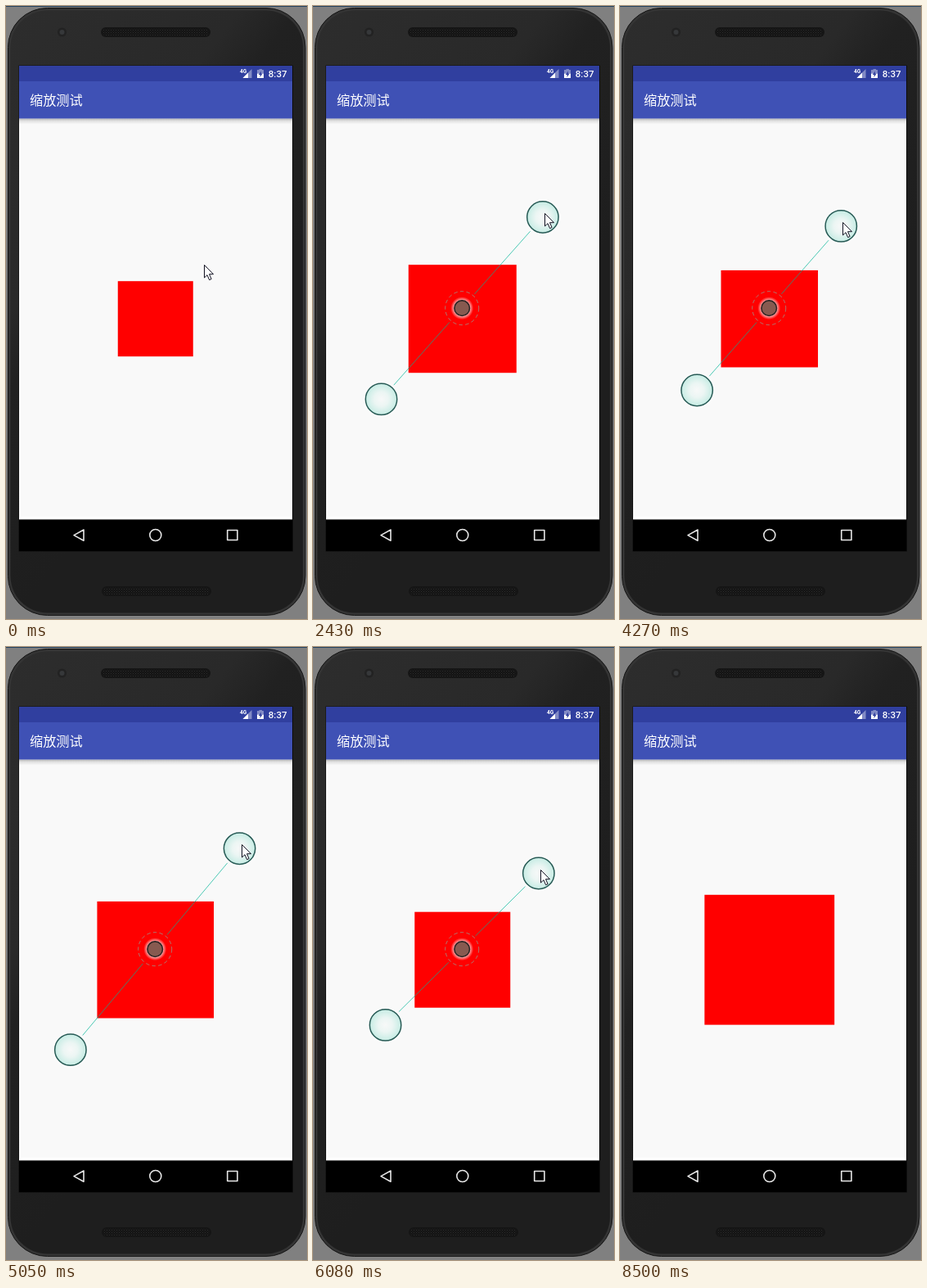
Recreate the animation shown at these times as an HTML page. Size 368 by 749 pixels, loop 8600 ms.

```html
<!DOCTYPE html>
<html lang="zh">
<head>
<meta charset="utf-8">
<title>缩放测试</title>
<style>
html, body { margin: 0; width: 100%; height: 100%; overflow: hidden; background: #808080; }
svg { display: block; }
.title { font: 16.2px "Noto Sans CJK SC", "Noto Sans CJK", sans-serif; fill: #fff; }
.clock { font: 500 11.5px Roboto, sans-serif; fill: #fff; }
.net { font: 700 6.5px Roboto, sans-serif; fill: #fff; }
.nav { fill: none; stroke: #e6e6e6; stroke-width: 1.6; stroke-linejoin: round; }
.ray { stroke: #00b496; stroke-opacity: .7; }
</style>
</head>
<body>
<svg width="368" height="749" viewBox="0 0 368 749">
  <defs>
    <linearGradient id="shell" gradientUnits="userSpaceOnUse" x1="0" y1="0" x2="368" y2="280">
      <stop offset="0" stop-color="#2d2d2d"/>
      <stop offset=".5" stop-color="#292929"/>
      <stop offset=".62" stop-color="#212121"/>
      <stop offset="1" stop-color="#1e1e1e"/>
    </linearGradient>
    <linearGradient id="shade" x2="0" y2="1">
      <stop offset="0" stop-opacity=".28"/>
      <stop offset=".4" stop-opacity=".1"/>
      <stop offset="1" stop-opacity="0"/>
    </linearGradient>
    <radialGradient id="teal">
      <stop offset="0" stop-color="#3cc8aa" stop-opacity=".01"/>
      <stop offset=".45" stop-color="#3cc8aa" stop-opacity=".07"/>
      <stop offset="1" stop-color="#3cc8aa" stop-opacity=".27"/>
    </radialGradient>
    <radialGradient id="halo">
      <stop offset=".79" stop-color="#fff" stop-opacity="0"/>
      <stop offset=".8" stop-color="#fff" stop-opacity=".5"/>
      <stop offset="1" stop-color="#fff" stop-opacity="0"/>
    </radialGradient>
    <radialGradient id="glow">
      <stop offset=".7" stop-color="#fff" stop-opacity=".65"/>
      <stop offset="1" stop-color="#fff" stop-opacity="0"/>
    </radialGradient>
    <pattern id="mesh" width="3" height="3" patternUnits="userSpaceOnUse">
      <rect width="3" height="3" fill="#131313"/>
      <rect width="1" height="1" fill="#2c2c2c"/>
      <rect x="1.5" y="1.5" width="1" height="1" fill="#272727"/>
    </pattern>
    <g id="grille">
      <rect width="134" height="12" rx="6" fill="#151515"/>
      <rect x="2" y="1.5" width="130" height="9" rx="4.5" fill="url(#mesh)"/>
    </g>
    <g id="finger">
      <circle r="24" fill="url(#halo)"/>
      <circle r="19.2" fill="url(#teal)" stroke="#275a55" stroke-width="1.5"/>
    </g>
  </defs>

  <!-- phone -->
  <rect width="368" height="749" fill="#808080"/>
  <rect width="368" height="1" fill="#24425f"/>
  <rect x="2.5" y="2.5" width="363.5" height="742" rx="48" fill="#343434" stroke="#141414"/>
  <rect x="5.5" y="5.5" width="357.5" height="736" rx="45" fill="url(#shell)"/>
  <circle cx="68.5" cy="32" r="5.5" fill="#222"/>
  <circle cx="68.5" cy="32" r="3" fill="#36383a"/>
  <use href="#grille" x="116" y="26"/>
  <use href="#grille" x="117" y="709"/>

  <!-- screen -->
  <rect x="15.5" y="72.5" width="335.5" height="594" fill="#0c0c0c"/>
  <rect x="16" y="137" width="334" height="491" fill="#f9f9f9"/>
  <rect x="16" y="624" width="334" height="4" fill="#fff"/>
  <rect x="16" y="137.5" width="334" height="7" fill="url(#shade)"/>
  <rect x="16" y="92" width="334" height="45.5" fill="#3f51b5"/>
  <rect x="16" y="73" width="334" height="19" fill="#303f9f"/>
  <text class="title" x="29" y="121">缩放测试</text>
  <text class="net" x="286" y="82">4G</text>
  <path d="M300.5 77v11h-11z" fill="#fff" fill-opacity=".4"/>
  <path d="M296 81.500v6.500h-6.500z" fill="#fff"/>
  <path d="M309.500 77h3.500v1h2v4.500h-8v-4.500h2.500z" fill="#fff" fill-opacity=".4"/>
  <path d="M307 82.500h8v5.500h-8z" fill="#fff"/>
  <path d="M311.800 79.500l-3 4.500h1.800v3l3-4.500h-1.800z" fill="#303f9f"/>
  <text class="clock" x="320.800" y="87">8:37</text>
  <rect x="16" y="627.4" width="334" height="38.6" fill="#000"/>
  <path class="nav" d="M95 640v13.200l-12-6.600zM270.700 640.500h12.200v12h-12.200z"/>
  <circle class="nav" cx="182.800" cy="646.500" r="7"/>

  <rect id="box" fill="#f00"/>

  <g id="pinch">
    <line class="ray" id="rayA"/>
    <line class="ray" id="rayB"/>
    <g id="hub">
      <circle r="20.500" fill="none" stroke="#8fa99f" stroke-opacity=".7" stroke-dasharray="4.500 3.300"/>
      <circle r="14" fill="url(#glow)"/>
      <circle r="9.300" fill="#875a50" stroke="#2b2423" stroke-width="1.600"/>
    </g>
    <use id="fingerA" href="#finger"/>
    <use id="fingerB" href="#finger"/>
  </g>
  <path id="mouse" d="M.5 .5v15.500l3.500-3.300 2.600 6 2.500-1.100-2.600-5.900h5z" fill="#fff" stroke="#101020"/>
</svg>
<script>
const $ = id => document.getElementById(id);
const LOOP = 8600, PIVOT = [182.2, 369.2], CENTER = [182.75, 382.2];
const GAP = 23, RATIO = 0.888, MIN_SIZE = 92, RELEASE = 7560;

// first refresh, last refresh, number of even intervals
const bursts = [[1830, 3100, 9], [3370, 5500, 15], [5650, 7160, 11], [RELEASE, 8500, 6]];

// turning points of the finger: time, x, y
const path = [
  [0, 240, 319], [1680, 240, 319], [2850, 301, 228], [3490, 311, 212], [3760, 311, 212],
  [4580, 243, 307], [5560, 327, 187], [6230, 267, 292], [6600, 288, 260],
  [7160, 356, 327], [RELEASE - 60, 356, 327], [8500, 330, 800]
];

// the screen holds its picture between refreshes
function refresh(t) {
  const burst = bursts.filter(b => b[0] <= t).pop();
  if (!burst) return 0;
  const [first, last, n] = burst, gap = (last - first) / n;
  return first + gap * Math.min(n, Math.floor((t - first) / gap + 0.2));
}

function fingerAt(t) {
  const i = path.findIndex(k => k[0] > t);
  if (i < 0) return path[path.length - 1].slice(1);
  const [t0, x0, y0] = path[i - 1], [t1, x1, y1] = path[i];
  const p = (1 - Math.cos(Math.PI * (t - t0) / (t1 - t0))) / 2;
  return [x0 + (x1 - x0) * p, y0 + (y1 - y0) * p];
}

function set(id, attrs) {
  for (const k in attrs) $(id).setAttribute(k, attrs[k]);
}

const move = (id, x, y) => set(id, { transform: `translate(${x} ${y})` });

function ray(id, dx, dy, side) {
  const d = Math.hypot(dx, dy), a = side * GAP / d, b = side * (1 - GAP / d);
  set(id, {
    x1: PIVOT[0] + dx * a, y1: PIVOT[1] + dy * a,
    x2: PIVOT[0] + dx * b, y2: PIVOT[1] + dy * b
  });
}

function sizeAt(t) {
  const [x, y] = fingerAt(Math.min(t, RELEASE - 60));
  return Math.max(MIN_SIZE, RATIO * Math.hypot(x - PIVOT[0], y - PIVOT[1]));
}

function draw(time) {
  const t = refresh(time), [x, y] = fingerAt(t), size = sizeAt(t);
  const dx = x - PIVOT[0], dy = y - PIVOT[1];
  const pressed = time >= 990 && time < RELEASE && !(time >= 3640 && time < 3760);

  set("box", { x: CENTER[0] - size / 2, y: CENTER[1] - size / 2, width: size, height: size });
  move("mouse", Math.round(x + 2), Math.round(y + dy * 0.035 - 1));
  move("fingerA", x, y);
  move("fingerB", PIVOT[0] - dx, PIVOT[1] - dy);
  ray("rayA", dx, dy, 1);
  ray("rayB", dx, dy, -1);
  $("pinch").style.display = pressed ? "" : "none";
}

move("hub", ...PIVOT);
const start = performance.now();
function loop() {
  draw((performance.now() - start) % LOOP);
  requestAnimationFrame(loop);
}
loop();
</script>
</body>
</html>
```
